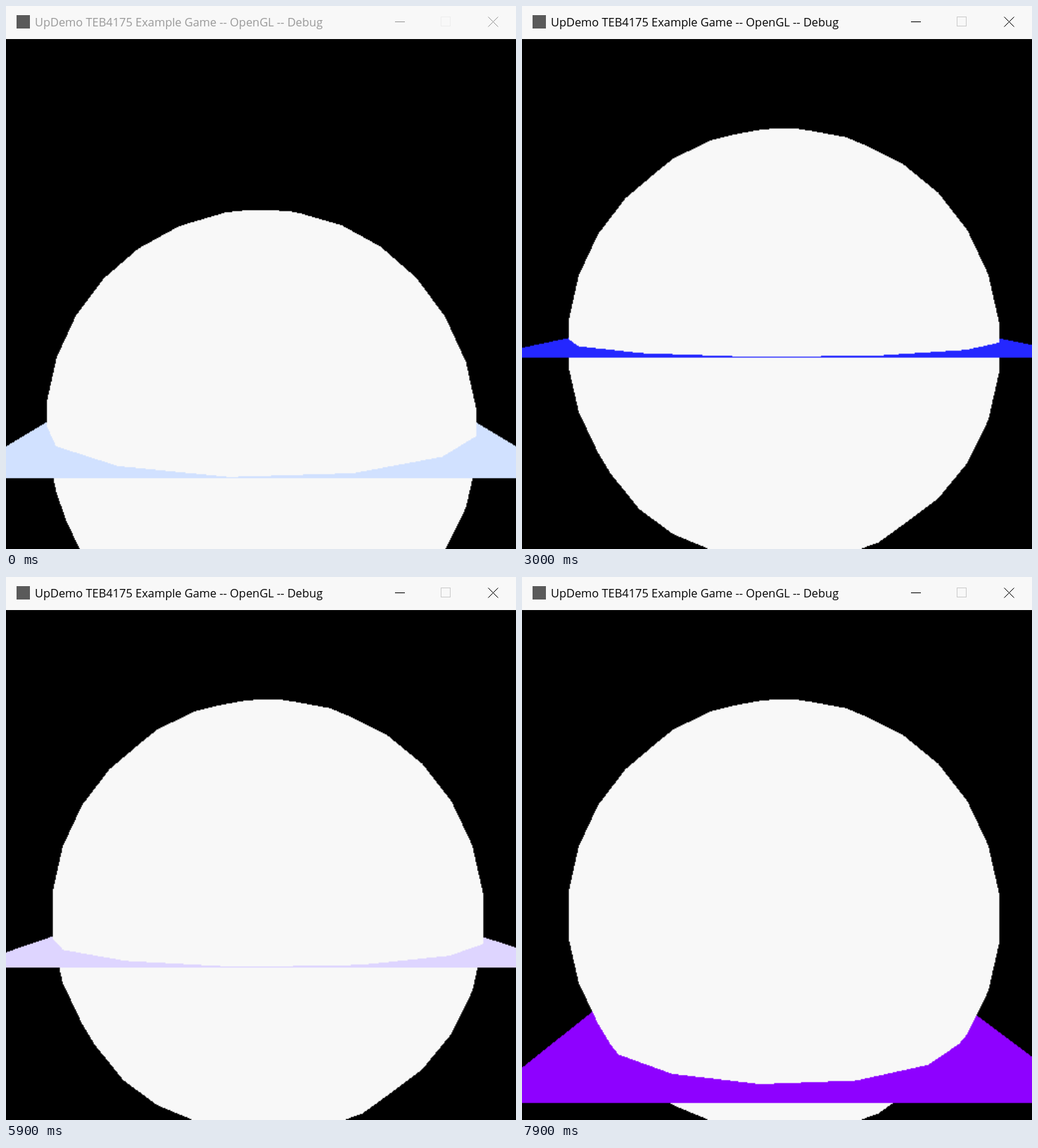
Animation of 725x772 px, one loop 8000 ms. Source, as an HTML page with a canvas:

```html
<!DOCTYPE html>
<html lang="en">
<head>
<meta charset="utf-8">
<title>Sphere and plane</title>
<style>
  html, body { margin: 0; width: 100%; height: 100%; overflow: hidden; background: #000; }
  canvas { display: block; position: absolute; left: 0; top: 0; }
  #title {
    position: absolute; left: 41px; top: 0; white-space: pre;
    font: 400 16.4px/46px "Open Sans", "Noto Sans", sans-serif;
  }
</style>
</head>
<body>
<canvas id="stage" width="725" height="772"></canvas>
<div id="title">UpDemo TEB4175 Example Game -- OpenGL -- Debug</div>
<script>
const ctx = document.getElementById('stage').getContext('2d');
const title = document.getElementById('title');

const LOOP = 8000, STEP = 100, WAKE = 300;
const W = 725, H = 772;
const VIEW_TOP = 46.6, VIEW_SIZE = 725.3;
const RES = 512, MID = RES / 2, DIST = 3;
const FOCAL = MID / Math.tan(Math.PI / 8);
const SECTORS = 15, STACKS = 15;
const WHITE = '#f8f8f8';

// The scene is rasterised hard-edged at low resolution, then scaled up
const buffer = document.createElement('canvas');
buffer.width = buffer.height = RES;
const view = buffer.getContext('2d');

// [time, value] keys, linear in between
const camY = [[1009, 0.598], [2737, 0.2265]];
const camX = [[1800, 0], [2000, 0.04], [2400, 0.04], [2460, 0.027]];
const planeY = [[2900, 0], [3800, 0.187], [4150, 0.262], [5200, 0.038], [5900, -0.107],
  [6100, -0.149], [7000, -0.348], [7200, -0.401], [7900, -0.547]];

function track(keys, t) {
  if (t <= keys[0][0]) return keys[0][1];
  for (let i = 1; i < keys.length; i++) {
    const [t0, a] = keys[i - 1], [t1, b] = keys[i];
    if (t <= t1) return a + (b - a) * (t - t0) / (t1 - t0);
  }
  return keys[keys.length - 1][1];
}

// Points of one horizontal ring of the sphere mesh
function ring(radius, y) {
  return Array.from({ length: SECTORS }, (_, i) => {
    const a = i * 2 * Math.PI / SECTORS;
    return [radius * Math.cos(a), y, radius * Math.sin(a)];
  });
}

const rings = Array.from({ length: STACKS + 1 }, (_, k) => {
  const lat = Math.PI * (k / STACKS - 0.5);
  return { r: Math.cos(lat), y: Math.sin(lat) };
});

function crossSection(y) {
  const k = rings.findIndex(g => g.y > y);
  const lo = rings[k - 1], hi = rings[k];
  return ring(lo.r + (hi.r - lo.r) * (y - lo.y) / (hi.y - lo.y), y);
}

function hull(points) {
  const sorted = points.slice().sort((a, b) => a[0] - b[0] || a[1] - b[1]);
  const half = list => {
    const out = [];
    for (const p of list) {
      while (out.length > 1) {
        const [a, b] = out.slice(-2);
        if ((b[0] - a[0]) * (p[1] - a[1]) - (b[1] - a[1]) * (p[0] - a[0]) > 0) break;
        out.pop();
      }
      out.push(p);
    }
    return out.slice(0, -1);
  };
  return half(sorted).concat(half(sorted.reverse()));
}

// Fills a convex polygon row by row, sampling pixel centres
function fillConvex(points, color) {
  const ys = points.map(p => p[1]);
  const first = Math.max(0, Math.ceil(Math.min(...ys) - 0.5));
  const last = Math.min(RES, Math.ceil(Math.max(...ys) - 0.5));
  view.fillStyle = color;
  for (let row = first; row < last; row++) {
    const y = row + 0.5;
    let left = Infinity, right = -Infinity;
    points.forEach((a, i) => {
      const b = points[(i + 1) % points.length];
      if ((a[1] <= y) === (b[1] <= y)) return;
      const x = a[0] + (b[0] - a[0]) * (y - a[1]) / (b[1] - a[1]);
      left = Math.min(left, x);
      right = Math.max(right, x);
    });
    const x0 = Math.ceil(left - 0.5), x1 = Math.ceil(right - 0.5);
    if (x1 > x0) view.fillRect(x0, row, x1 - x0, 1);
  }
}

function planeColor(t) {
  const degrees = t < WAKE ? 40 : 131.6 + 0.0628 * (t - 1500);
  const a = degrees * Math.PI / 180;
  const channel = v => Math.round(127.5 + 127.5 * v);
  return `rgb(${channel(Math.sin(a))},${channel(Math.cos(a))},255)`;
}

function drawScene(t) {
  const eyeX = track(camX, t), eyeY = track(camY, t), level = track(planeY, t);
  const project = ([x, y, z]) => {
    const s = FOCAL / (DIST - z);
    return [MID + (x + eyeX) * s, MID + (eyeY - y) * s];
  };
  const drawBall = keep => {
    const pts = rings.filter(keep).flatMap(g => ring(g.r, g.y)).concat(crossSection(level));
    fillConvex(hull(pts.map(project)), WHITE);
  };

  view.fillStyle = '#000';
  view.fillRect(0, 0, RES, RES);
  drawBall(g => g.y <= level);
  // The plane is one-sided: nothing shows from underneath
  if (level < eyeY) {
    const quad = [[-1, level, 1], [1, level, 1], [1, level, -1], [-1, level, -1]];
    fillConvex(quad.map(project), planeColor(t));
  }
  drawBall(g => g.y > level);
  ctx.drawImage(buffer, 0, VIEW_TOP, VIEW_SIZE, VIEW_SIZE);
}

function drawBar(active) {
  const ink = active ? '#000' : '#999';
  ctx.fillStyle = '#5a5a5a';
  ctx.fillRect(15, 13, 19, 19);

  ctx.lineWidth = 1;
  ctx.strokeStyle = active ? '#ccc' : '#eee';
  ctx.strokeRect(618.5, 15.5, 13, 13);
  ctx.fillStyle = ink;
  ctx.fillRect(553, 22, 14, 1);
  ctx.strokeStyle = ink;
  ctx.beginPath();
  ctx.moveTo(685.5, 15.5);
  ctx.lineTo(699.5, 29.5);
  ctx.moveTo(699.5, 15.5);
  ctx.lineTo(685.5, 29.5);
  ctx.stroke();
  title.style.color = ink;
}

const start = performance.now();

function frame() {
  const elapsed = (performance.now() - start) % LOOP;
  const t = Math.floor(elapsed / STEP) * STEP;
  ctx.fillStyle = WHITE;
  ctx.fillRect(0, 0, W, H);
  drawScene(t);
  drawBar(t >= WAKE);
  requestAnimationFrame(frame);
}
frame();
</script>
</body>
</html>
```
